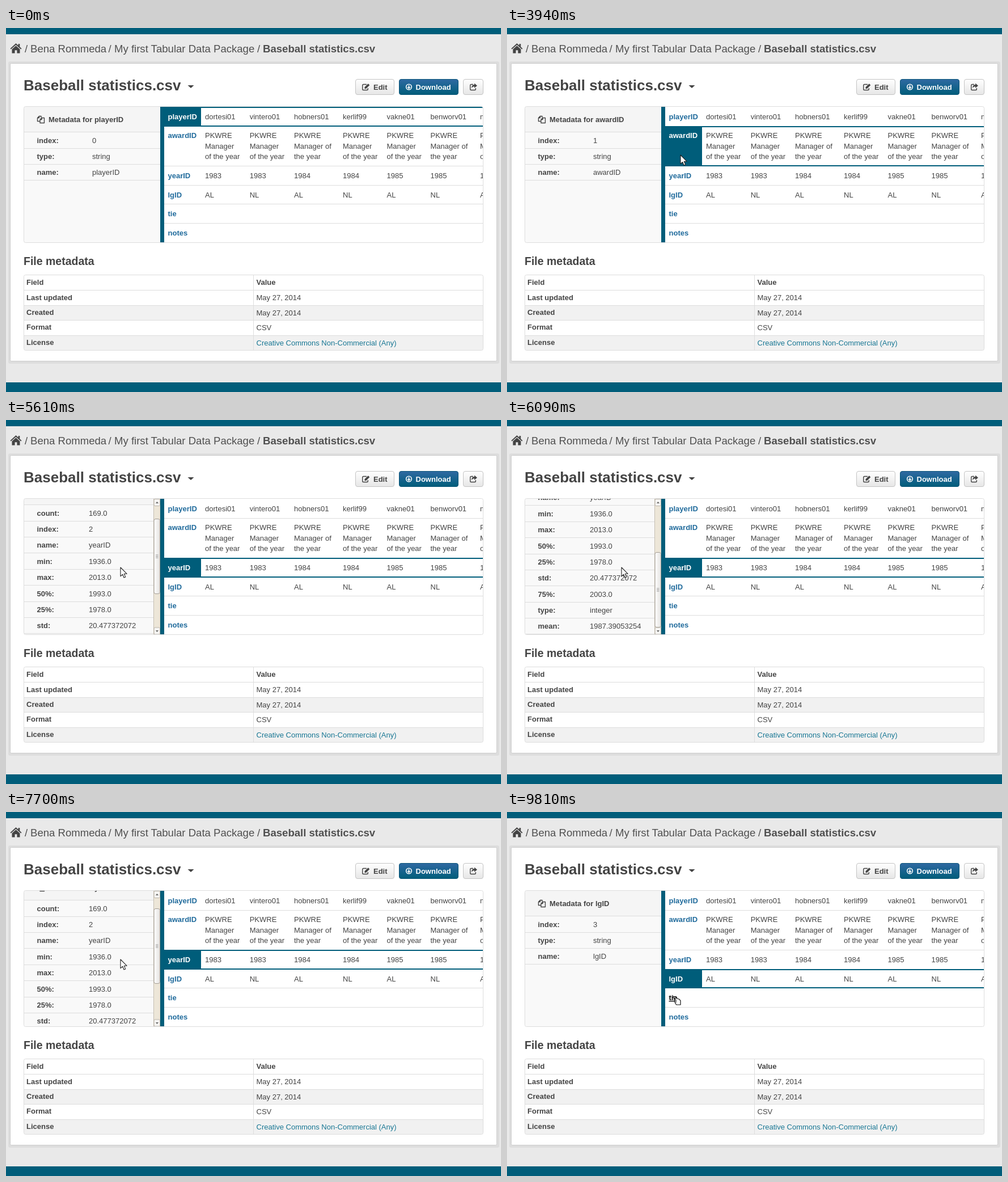
An HTML page for the animation above (9950 ms loop, 873 by 642 pixels).

```html
<!DOCTYPE html>
<html lang="en">
<head>
<meta charset="utf-8">
<title>Tabular data viewer</title>
<style>
html, body { margin: 0; width: 100%; height: 100%; overflow: hidden; background: #e9e9e9; }
svg { display: block; }
text { font: 13px "Liberation Sans", Arial, sans-serif; fill: #444; white-space: pre; }
.bold { font-weight: bold; }
.crumb { font-size: 18.57px; fill: #505050; }
.title { font-size: 26px; }
.section { font-size: 19.5px; }
.white { fill: #fff; }
.license { fill: #187794; }
.link { fill: #206b9c; }
.link.hover { fill: #000; text-decoration: underline; }
.link.active { fill: #fff; text-decoration: none; }
.line { fill: #ddd; }
.teal { fill: #005d7a; }
.icon { fill: none; stroke: #444; stroke-width: 1.4; stroke-linejoin: round; }
</style>
</head>
<body>
<svg id="stage" width="873" height="642" viewBox="0 0 873 642">
  <defs>
    <linearGradient id="pale" x2="0" y2="1"><stop stop-color="#fff"/><stop offset="1" stop-color="#e6e6e6"/></linearGradient>
    <linearGradient id="blue" x2="0" y2="1"><stop stop-color="#2f69a2"/><stop offset="1" stop-color="#005d7a"/></linearGradient>
    <linearGradient id="thumbFill"><stop stop-color="#fff"/><stop offset="1" stop-color="#e4e2df"/></linearGradient>
    <clipPath id="viewerClip"><rect x="32" y="139" width="809" height="239" rx="2"/></clipPath>
    <clipPath id="panelClip"><rect x="32" y="139" width="240" height="239"/></clipPath>
  </defs>
  <g id="page"></g>
  <g id="viewer" clip-path="url(#viewerClip)"></g>
  <rect x="31.5" y="138.5" width="810" height="240" rx="3" fill="none" stroke="#ddd"/>
  <g id="cursor" stroke-linejoin="round">
    <path id="arrow" d="M0 0V15.6L3.6 12.3 6 18 8.7 16.9 6.3 11.3H11.2Z" fill="#fff" stroke="#222" stroke-width="1.1"/>
    <g id="hand" fill="#fff" stroke="#111" stroke-width="1.2">
      <path d="M1 -.8Q-.8 -.5 .3 1.2L5 4.2H2.6Q.8 5 2.4 6.3L3 9.2 4.2 11.8 5.8 14H13V6.8L11 4.3 7.2 3Z"/>
      <path d="M3 6.6H6M3.5 9H6.3" fill="none"/>
    </g>
  </g>
</svg>
<script>
const LOOP = 9950;
const $ = id => document.getElementById(id);
const rect = (x, y, w, h, attrs = '') => `<rect x="${x}" y="${y}" width="${w}" height="${h}" ${attrs}/>`;
const text = (x, y, s, cls = '') => `<text x="${x}" y="${y}" class="${cls}">${s}</text>`;
const line = (x, y, w) => rect(x, y, w, 1, 'class="line"');

// Page chrome
function button(x, w, fill, border) {
  return rect(x + .5, 90.5, w - 1, 27, `rx="3.5" fill="url(#${fill})" stroke="${border}"`);
}

function pageMarkup() {
  const fields = [
    ['Last updated', 'May 27, 2014'], ['Created', 'May 27, 2014'], ['Format', 'CSV'],
    ['License', 'Creative Commons Non-Commercial (Any)']
  ];
  const rowTop = i => Math.round(435.5 + i * 26.5);
  let out = rect(0, 0, 873, 642, 'fill="#e9e9e9"') +
    rect(0, 0, 873, 11, 'class="teal"') + rect(0, 625, 873, 17, 'class="teal"') +
    rect(4, 59, 866, 533, 'rx="3" fill="#000" fill-opacity=".05"') +
    rect(7.5, 62.5, 858, 525, 'rx="2" fill="#fff" stroke="#ccc"') +
    `<path d="M17.5 27 7.5 36.2 8.8 37.5 17.5 29.8 26.2 37.5 27.5 36.2 24.3 33.2V28H21.6V30.8ZM17.5 31.2 10.5 37.4V44.5H15.6V39.3H19.4V44.5H24.5V37.4Z" fill="#444"/>` +
    [[33, '/'], [43, 'Bena Rommeda'], [180.5, '/'], [191, 'My first Tabular Data Package'], [443, '/']]
      .map(([x, s]) => text(x, 43, s, 'crumb')).join('') +
    text(453, 43, 'Baseball statistics.csv', 'crumb bold') +
    text(31, 110, 'Baseball statistics.csv', 'title bold') +
    '<path d="M320.5 101H331.5L326 106Z" fill="#444"/>' +
    button(616, 69, 'pale', '#c4c4c4') + button(693, 105, 'blue', '#0a5578') + button(806, 36, 'pale', '#c4c4c4') +
    '<path class="icon" d="M636 99.5H630.5Q628.7 99.5 628.7 101.3V107.7Q628.7 109.5 630.5 109.5H636.5Q638.3 109.5 638.3 107.7V106"/>' +
    '<path d="M632.5 107V104.3L638.7 98.2 641.3 100.8 635.1 107Z" fill="#444"/>' +
    text(648, 109, 'Edit', 'bold') +
    '<g fill="none" stroke="#fff" stroke-width="1.6"><circle cx="710.5" cy="104" r="4.8"/><path d="M710.5 101V106.3M708 104.2 710.5 106.7 713 104.2"/></g>' +
    text(722.5, 109, 'Download', 'bold white') +
    '<path class="icon" d="M824 99.5H820.5Q818.7 99.5 818.7 101.3V107.7Q818.7 109.5 820.5 109.5H826.5Q828.3 109.5 828.3 107.7V106"/>' +
    '<path d="M826 97.5 831 101.7 826 105.8V103.3Q822.5 103 821.3 106.5 820.6 100.4 826 100Z" fill="#444"/>' +
    text(31, 418, 'File metadata', 'section bold') +
    rect(32, rowTop(2), 809, 26, 'fill="#f1f1f1"') + rect(32, rowTop(4), 809, 26, 'fill="#f1f1f1"') +
    text(36, 453, 'Field', 'bold') + text(441.5, 453, 'Value', 'bold');
  fields.forEach(([name, value], i) => {
    const base = Math.round(479.6 + i * 26.4);
    out += line(32, rowTop(i + 1), 809) + text(36, base, name, 'bold') +
      text(441.5, base + (i ? 1 : 0), value, i === 3 ? 'license' : '');
  });
  return out + rect(436, 436, 1, 132, 'class="line"') +
    rect(31.5, 435.5, 810, 133, 'rx="3" fill="none" stroke="#ddd"');
}

// Data grid
const LABELS = ['playerID', 'awardID', 'yearID', 'lgID', 'tie', 'notes'];
const EDGES = [139, 173, 243, 277, 310, 344, 378];
const BASES = [161, 194, 265, 299, 332, 366];
const COLUMNS = [
  [351, 'dortesi01'], [429.7, 'vintero01'], [508, 'hobners01'], [594, 'kerlif99'],
  [671.5, 'vakne01'], [748.5, 'benworv01'], [836, 'mardeku01']
];

function gridMarkup() {
  let out = rect(272, 139, 570, 239, 'fill="#fff"');
  EDGES.slice(1, -1).forEach(y => out += line(279, y, 562));
  out += '<g id="active" class="teal"></g>' + rect(272, 139, 7, 239, 'class="teal"');
  LABELS.forEach((s, i) => out += text(285.5, BASES[i], s, 'bold link'));
  COLUMNS.forEach(([x, player], i) => {
    const award = i % 3 === 2 ? ['Manager of', 'the year'] : ['Manager', 'of the year'];
    out += text(x, 161, player) + text(x, 194, 'PKWRE') + text(x, 213, award[0]) + text(x, 231, award[1]) +
      text(x, 265, 1983 + (i >> 1)) + text(x, 299, i % 2 ? 'NL' : 'AL');
  });
  return out;
}

// Metadata panel
const plain = (index, name) => [['index', index], ['type', 'string'], ['name', name]];
const META = [
  plain(0, 'playerID'), plain(1, 'awardID'),
  [['count', '169.0'], ['index', 2], ['name', 'yearID'], ['min', '1936.0'], ['max', '2013.0'], ['50%', '1993.0'],
    ['25%', '1978.0'], ['std', '20.477372072'], ['75%', '2003.0'], ['type', 'integer'], ['mean', '1987.39053254']],
  plain(3, 'lgID')
];
const PITCH = 28.36;

function panelMarkup(rows, i) {
  const long = rows.length > 3;
  const width = long ? 229 : 240;
  let out = rect(32, 139, width, 44, 'fill="#f5f5f5"') + line(32, 183, width) +
    '<path class="icon" stroke-width="1.2" d="M60 164.5H55.5V158.5L58.5 155.5H62V158M58.5 155.5V158.5H55.5M60 167.5V161.5L63 158.5H67.5V167.5ZM63 158.5V161.5H60"/>' +
    text(75, 166, 'Metadata for ' + LABELS[i], 'bold');
  rows.forEach(([key, value], n) => {
    const y = n * PITCH;
    out += text(54.5, Math.round(202.7 + y), key + ':', 'bold') +
      text(long ? 146 : 152, Math.round(202.7 + y), value) + line(32, Math.round(183.4 + y + PITCH), width);
  });
  return `<g class="panel">${out}</g>`;
}

function scrollbarMarkup() {
  return '<g id="scrollbar">' + rect(260.5, 139, 11.5, 239, 'fill="#ede6d8" stroke="#c5beb2"') +
    rect(261, 139.5, 10.5, 12, 'rx="2" fill="#f6f5f3" stroke="#bbb5aa"') +
    rect(261, 366, 10.5, 12, 'rx="2" fill="#f6f5f3" stroke="#bbb5aa"') +
    '<path d="M264 147H269L266.3 144ZM264 371H269L266.3 374Z" fill="#666"/>' +
    '<g id="thumb">' + rect(261, 0, 10.5, 132, 'rx="3" fill="url(#thumbFill)" stroke="#a39c92"') +
    '<path d="M264 63.5H268.5M264 66H268.5M264 68.5H268.5" stroke="#999"/></g></g>';
}

$('page').innerHTML = pageMarkup();
$('viewer').innerHTML = gridMarkup() + '<g clip-path="url(#panelClip)">' +
  rect(32, 139, 240, 239, 'fill="#f9f9f9"') + META.map(panelMarkup).join('') + scrollbarMarkup() + '</g>';

// Timeline: [ms, values...]
const POINTER = [
  [1850, 330, 147], [1970, 318, 158], [2090, 311.5, 165.5], [2630, 311.5, 165.5], [2960, 311, 173], [3410, 309, 182],
  [3690, 309, 182], [3780, 308, 190], [3940, 306.5, 223.5], [4140, 305, 246], [4390, 305, 255],
  [4910, 305, 255], [5010, 295, 256], [5240, 220, 260], [5400, 202, 260],
  [8050, 202, 260], [8200, 225, 264], [8450, 300, 284], [8570, 314, 289], [8760, 304, 293],
  [9230, 304, 293], [9380, 302, 303], [9600, 296, 320], [9810, 293, 326]
];
const SCROLL = [
  [5450, 0], [5610, 34], [5890, 96], [6000, 112], [6090, 118],
  [7340, 118], [7460, 90], [7700, 28], [7800, 9], [7900, 0]
];
const CLICKS = [0, 3690, 4910, 9230];

function at(track, t) {
  const next = track.findIndex(k => k[0] > t);
  if (next === 0) return track[0].slice(1);
  if (next < 0) return track[track.length - 1].slice(1);
  const a = track[next - 1], b = track[next], p = (t - a[0]) / (b[0] - a[0]);
  return a.slice(1).map((v, i) => v + (b[i + 1] - v) * p);
}

const links = [...document.querySelectorAll('.link')];
const linkWidths = links.map(link => link.getComputedTextLength());
const panels = [...document.querySelectorAll('.panel')];
const show = (el, on) => el.setAttribute('visibility', on ? 'visible' : 'hidden');
let shown = -1;

function activate(row) {
  if (row === shown) return;
  shown = row;
  const top = EDGES[row], bottom = EDGES[row + 1];
  $('active').innerHTML = rect(279, top, 65, bottom - top) + rect(279, top, 562, 2) + rect(279, bottom - 1, 562, 2);
  panels.forEach((panel, i) => show(panel, i === row));
  show($('scrollbar'), row === 2);
}

function draw(t) {
  const row = CLICKS.filter(ms => ms <= t).length - 1;
  activate(row);

  const scroll = Math.round(at(SCROLL, t)[0]);
  panels[2].setAttribute('transform', `translate(0 ${-scroll})`);
  $('thumb').setAttribute('transform', `translate(0 ${Math.round(151 + scroll * .7) - .5})`);

  const [x, y] = at(POINTER, t).map(Math.round);
  const visible = t >= 1850;
  const over = visible ? links.findIndex((_, i) =>
    x >= 285 && x <= 285.5 + linkWidths[i] && y >= BASES[i] - 13 && y <= BASES[i] + 3) : -1;
  links.forEach((link, i) => {
    link.classList.toggle('active', i === row);
    link.classList.toggle('hover', i === over);
  });
  $('cursor').setAttribute('transform', `translate(${x} ${y})`);
  show($('arrow'), visible && over < 0);
  show($('hand'), visible && over >= 0);
}

const start = performance.now();
function tick() {
  draw((performance.now() - start) % LOOP);
  requestAnimationFrame(tick);
}
tick();
</script>
</body>
</html>
```
